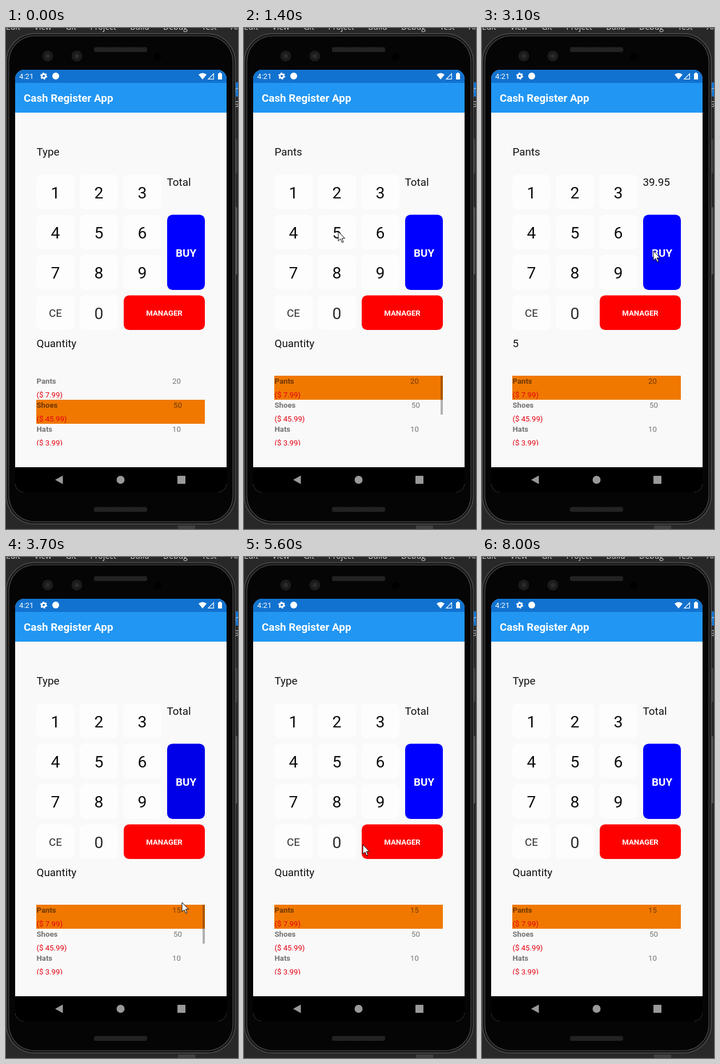
An HTML page for the animation above (8400 ms loop, 406x876 px).

```html
<!DOCTYPE html>
<html lang="en">
<head>
<meta charset="utf-8">
<title>Cash Register App</title>
<style>
html, body { margin: 0; width: 100%; height: 100%; overflow: hidden; background: #282829; }
svg { display: block; width: 406px; height: 876px; }
text { font-family: Roboto, sans-serif; white-space: pre; }
.menu text { font: 14px "Open Sans", sans-serif; fill: #d6d6d6; }
.label { font-size: 18.84px; fill: #111; }
.digit { font-size: 28.3px; fill: #0c0c0c; }
.small { font-size: 13.2px; }
.mid { text-anchor: middle; }
.bold { font-weight: 700; }
.soft { fill: #2b2b2b; }
.light { fill: #fff; }
.item { fill: rgba(0, 0, 0, .54); }
.price { fill: #e6000f; }
</style>
</head>
<body>
<svg viewBox="0 0 406 876" xmlns="http://www.w3.org/2000/svg">
  <defs>
    <clipPath id="screen"><rect x="16" y="73" width="370" height="739" rx="16"/></clipPath>
    <clipPath id="listArea"><rect x="50" y="608" width="300" height="122"/></clipPath>
    <pattern id="mesh" width="4" height="4" patternUnits="userSpaceOnUse">
      <rect width="4" height="4" fill="#1a1a1a"/>
      <path d="M0 4L4 0M0 0L4 4" stroke="#303030" stroke-width=".8"/>
    </pattern>
  </defs>

  <!-- editor window behind the phone -->
  <rect width="406" height="876" fill="#282829"/>
  <rect x="396" y="95" width="10" height="25" fill="#1475cf"/>
  <g class="menu" id="menu"><text x="400" y="113">m</text><text x="400" y="138">9</text></g>
  <rect x="301" y="870" width="30" height="6" fill="#414142"/>

  <!-- phone body -->
  <rect x="400" y="194" width="4.5" height="60" rx="2" fill="#454545"/>
  <rect x="400" y="313" width="4.5" height="118" rx="2" fill="#5a5a5a"/>
  <g id="body"></g>
  <g id="speakers"></g>
  <g id="lenses"></g>

  <!-- screen -->
  <g clip-path="url(#screen)">
    <rect x="16" y="73" width="370" height="739" fill="#f9f9f9"/>
    <rect x="16" y="73" width="370" height="75" fill="#2196f3"/>
    <rect x="16" y="73" width="370" height="23" fill="#1272cf"/>
    <rect x="16" y="768" width="370" height="44" fill="#000"/>
  </g>
  <g fill="#fff">
    <text class="small" x="23" y="89">4:21</text>
    <circle cx="66" cy="84" r="3.4" fill="none" stroke="#fff" stroke-width="2.8"/>
    <circle cx="66" cy="84" r="5.2" fill="none" stroke="#fff" stroke-width="1.8" stroke-dasharray="2.7 2.745"/>
    <circle cx="87" cy="84" r="6"/>
    <path d="M337 81.5Q344 76 351 81.5L344 90Z"/>
    <path d="M354 89.3L363.3 80V89.3Z" fill="none" stroke="#fff" stroke-width="1.2"/>
    <path d="M371 79.5h2v-1.5h3v1.5h2V90h-7Z"/>
    <text class="bold" x="31" y="129" font-size="18.84">Cash Register App</text>
  </g>
  <g fill="#999">
    <path d="M86 790L99.5 782.5V797.5Z"/>
    <circle cx="200.5" cy="790" r="7"/>
    <rect x="300" y="783" width="14" height="14" rx="1"/>
  </g>

  <text class="label" id="type" x="53.5" y="223"></text>
  <text class="label" id="total" x="281.5" y="276"></text>
  <text class="label" id="quantity" x="53.5" y="558"></text>
  <g id="keys"></g>

  <g clip-path="url(#listArea)">
    <rect id="highlight" x="53" width="295" height="42" fill="#f07800"/>
    <g id="rows"></g>
    <rect id="scrollbar" x="344" y="608" width="4" height="68" fill-opacity=".29"/>
  </g>
  <path id="cursor" d="M0 0V16.4L3.8 12.8L6.6 19L9 18L6.3 11.9H11.4Z" fill="#fff" stroke="#000" stroke-linejoin="round"/>
</svg>
<script>
const LOOP = 8400, STEP = 100;
const $ = id => document.getElementById(id);

function add(parent, tag, attrs, text = "") {
  const el = document.createElementNS("http://www.w3.org/2000/svg", tag);
  for (const name in attrs) el.setAttribute(name, attrs[name]);
  el.textContent = text;
  return $(parent).appendChild(el);
}
const write = (parent, kind, x, y, text) => add(parent, "text", { class: kind, x, y }, text);
const box = (parent, x, y, width, height, rx, fill) =>
  add(parent, "rect", { x, y, width, height, rx, fill });

"Edit View Git Project Build Debug Test Analyze".split(" ").reduce((x, word) =>
  x + write("menu", "", x, 2.5, word).getComputedTextLength() + 24.5, 0);

// nested outlines make the metal rim
["#4e4e4e", "#161616", "#161616", "#444", "#050505"].forEach((fill, i) => {
  const inset = i * 1.4;
  box("body", inset, 9 + inset, 402 - 2 * inset, 859 - 2 * inset, 50 - inset, fill);
});
for (const y of [33.5, 837.5]) box("speakers", 154, y, 93, 8.5, 3, "url(#mesh)");
for (const cx of [73, 124]) {
  add("lenses", "circle", { cx, cy: 49, r: 9.5, fill: "#1b1b1b" });
  add("lenses", "circle", { cx, cy: 49, r: 4, fill: "#2b2b2b" });
}
add("lenses", "circle", { cx: 265, cy: 50, r: 6.5, fill: "#000" });

const faces = {};
["123", "456", "789", ["CE", "0"]].forEach((line, row) =>
  [...line].forEach((key, col) => {
    const x = 53 + col * 76, y = 256 + row * 70.4;
    const kind = key === "CE" ? "label" : "digit", tone = row === 3 ? "soft" : "";
    const baseline = Math.floor(y + (key === "CE" ? 38 : 42));
    faces[key] = box("keys", x, y, 67, 60.5, 9.4, "#fdfdfd");
    write("keys", `${kind} ${tone} mid`, x + 33.5, baseline, key);
  }));
box("keys", 282, 326.5, 66, 131.5, 9.4, "#00f");
const buyShade = box("keys", 282, 326.5, 66, 131.5, 9.4, "#000");
write("keys", "label light bold mid", 315, 400, "BUY");
box("keys", 206, 467.5, 142, 60.5, 9.4, "#f00");
write("keys", "small light bold mid", 277, 503, "MANAGER");

const rowTop = row => 608 + row * 42;
const goods = [["Pants", 20, 7.99], ["Shoes", 50, 45.99], ["Hats", 10, 3.99]];
const counts = goods.map(([name, count, price], row) => {
  const y = rowTop(row);
  write("rows", "small item bold", 53.5, y + 14, name);
  write("rows", "small price", 53.5, y + 38, `($ ${price})`);
  return write("rows", "small item", row === 1 ? 293 : 291, y + 14, count);
});

// pointer stops: arrival time, travel time, place
const stops = [
  { at: 0, travel: 0, x: 410, y: 702 },
  { at: 300, travel: 300, x: 80, y: 630 },
  { at: 600, travel: 100, x: 165, y: 356 },
  { at: 1900, travel: 300, x: 285, y: 384 },
  { at: 2100, travel: 200, x: 300, y: 390 },
  { at: 3700, travel: 400, x: 308, y: 604 },
  { at: 4500, travel: 400, x: 290, y: 605 },
  { at: 4900, travel: 100, x: 267, y: 575 },
  { at: 5600, travel: 500, x: 208, y: 503 },
  { at: 5900, travel: 300, x: 202, y: 195 },
  { at: 7300, travel: 500, x: 9, y: 747 }
];

const clamp = v => Math.min(1, Math.max(0, v));
const smooth = k => k * k * (3 - 2 * k);
const pulse = (t, on, off, fade) => t < on ? 0 : clamp(1 - (t - off) / fade);

function pointerAt(t) {
  return stops.reduce((from, to) => {
    const k = to.travel ? smooth(clamp((t - to.at) / to.travel + 1)) : 1;
    return { x: from.x + (to.x - from.x) * k, y: from.y + (to.y - from.y) * k };
  });
}

function draw(t) {
  const sold = t >= 3400, picked = t >= 500, entered = t >= 2000 && !sold;
  const [name, count, price] = goods[0], amount = 5;
  $("type").textContent = picked && !sold ? name : "Type";
  $("total").textContent = entered ? (amount * price).toFixed(2) : "Total";
  $("quantity").textContent = entered ? amount : "Quantity";
  $("highlight").setAttribute("y", rowTop(picked ? 0 : 1));
  counts[0].textContent = sold ? count - amount : count;

  const { x, y } = pointerAt(t);
  $("cursor").setAttribute("transform", `translate(${x} ${y})`);
  $("cursor").style.visibility = t >= 100 && t < 8000 ? "visible" : "hidden";
  $("scrollbar").style.opacity = pulse(t, 500, 2100, 300) + pulse(t, 3500, 5100, 300);
  buyShade.style.opacity = .18 * pulse(t, 3200, 3500, 400);
  const grey = 253 * (1 - .12 * pulse(t, 1500, 1900, 400));
  faces[5].setAttribute("fill", `rgb(${grey},${grey},${grey})`);
}

const start = performance.now();
function tick() {
  const t = (performance.now() - start) % LOOP;
  draw(Math.floor(t / STEP) * STEP);
  requestAnimationFrame(tick);
}
tick();
</script>
</body>
</html>
```
